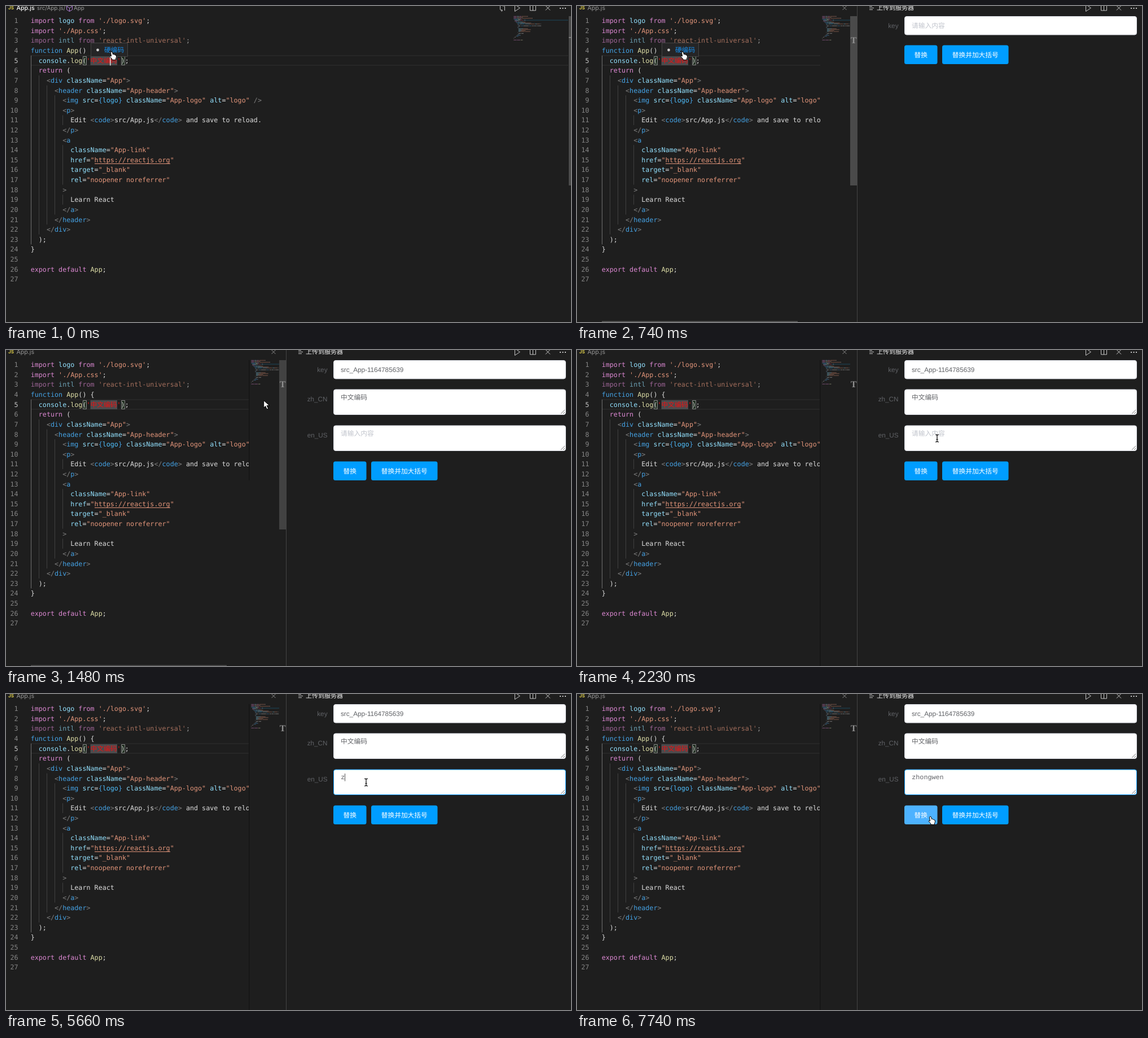
Animation of 1001x560 px, one loop 8 s. Source, as an HTML page with a canvas:

```html
<!DOCTYPE html>
<html lang="zh">
<head>
<meta charset="utf-8">
<style>
html, body { margin: 0; width: 100%; height: 100%; overflow: hidden; background: #1e1e1e }
canvas { display: block }
</style>
</head>
<body>
<canvas id="stage" width="1001" height="560"></canvas>
<script>
const c = document.getElementById('stage').getContext('2d');
const LOOP = 8000, CHAR = 7.056, ROW = 17.615, LEFT = 43.7;
const MONO = '11.72px "DejaVu Sans Mono", monospace';
const UI = '"Liberation Sans", "Noto Sans CJK SC", "Noto Sans CJK", sans-serif';
const CJK = '"Noto Sans CJK SC", "Noto Sans CJK", sans-serif';
const BODY = '11.72px ' + UI;

// "~x" switches to colour x
const COLORS = { k: '#dc88d2', v: '#92dffc', s: '#e2957a', w: '#dcdcdc', b: '#45a2e4',
  y: '#dfdfa8', g: '#808080', l: '#4fc1ff', r: '#f01010' };
const CODE = `~kimport~v logo~k from~s './logo.svg'~w;
~kimport~s './App.css'~w;
~kimport~v intl~k from~s 'react-intl-universal'~w;
~bfunction~y App~w() {
~v  console~w.~ylog~w(~r'中文编码'~w);
~k  return~w (
~g    <~bdiv~v className~w=~s"App"~g>
~g      <~bheader~v className~w=~s"App-header"~g>
~g        <~bimg~v src~w=~b{~llogo~b}~v className~w=~s"App-logo"~v alt~w=~s"logo"~g />
~g        <~bp~g>
~w          Edit ~g<~bcode~g>~wsrc/App.js~g</~bcode~g>~w and save to reload.
~g        </~bp~g>
~g        <~ba
~v          className~w=~s"App-link"
~v          href~w=~s"https://reactjs.org"
~v          target~w=~s"_blank"
~v          rel~w=~s"noopener noreferrer"
~g        >
~w          Learn React
~g        </~ba~g>
~g      </~bheader~g>
~g    </~bdiv~g>
~w  );
~w}

~kexport default~y App~w;
`.split('\n').map(line => {
  let col = 0;
  return line.split('~').slice(1).map(part => {
    const token = { color: COLORS[part[0]], text: part.slice(1), col };
    for (const ch of token.text) col += ch > '\u2fff' ? 11.75 / CHAR : 1;
    return token;
  });
});
// Indent guides: depth, first row, last row
const GUIDES = [[0, 5, 23], [1, 7, 22], [2, 8, 21], [3, 9, 20], [4, 11, 11], [4, 14, 17], [4, 19, 19]];

const rowTop = n => 17.3 + ROW * (n - 1);

function rect(x, y, w, h, color) {
  c.fillStyle = color;
  c.fillRect(x, y, w, h);
}
function text(str, x, y, color, font = BODY, align = 'left') {
  c.font = font;
  c.fillStyle = color;
  c.textAlign = align;
  c.fillText(str, x, y);
}
function box(x, y, w, h, r, fill, stroke) {
  c.beginPath();
  c.roundRect(x, y, w, h, r);
  if (fill) { c.fillStyle = fill; c.fill(); }
  if (stroke) { c.strokeStyle = stroke; c.lineWidth = 1; c.stroke(); }
}
function stroke(d, x, y, color, width = 1) {
  c.save();
  c.translate(x, y);
  c.strokeStyle = color;
  c.lineWidth = width;
  c.stroke(new Path2D(d));
  c.restore();
}
function shape(d, x, y) {
  c.save();
  c.translate(x, y);
  const path = new Path2D(d);
  c.fillStyle = '#fff';
  c.fill(path);
  c.restore();
  stroke(d, x, y, '#000');
}

function drawCode(split) {
  const right = split ? 431 : 996;
  rect(44, 87.5, right - 44, 1, '#303030');
  rect(44, 104.5, right - 44, 1, '#303030');
  for (const [depth, a, b] of GUIDES)
    rect(Math.round(LEFT + depth * 2 * CHAR), rowTop(a), 1, rowTop(b + 1) - rowTop(a), depth ? '#404040' : '#707070');
  rect(149.5, 89, 47.5, 16, '#4b4b4d');
  for (const x of [136.5, 204.5]) box(x, 89.5, 6, 15, 0, '#1c2a1c', '#8a8a8a');

  CODE.forEach((tokens, i) => {
    const base = 30.2 + ROW * i;
    text(i + 1, 21.5, base, i === 4 ? '#c6c6c6' : '#858585', MONO, 'right');
    c.save();
    c.beginPath();
    c.rect(0, 0, split ? 432 : 890, 560);
    c.clip();
    if (i === 2) c.globalAlpha = .67;
    for (const k of tokens) {
      const x = LEFT + k.col * CHAR;
      if (k.color === COLORS.r) {
        text("'", x, base, k.color, MONO);
        text('中文编码', x + CHAR, base + .5, k.color, '11.75px ' + CJK);
        text("'", x + CHAR + 47, base, k.color, MONO);
      } else text(k.text, x, base, k.color, MONO);
    }
    c.restore();
  });
  rect(157, 279, 134, 1, COLORS.s);
}

function drawMinimap(x0, right) {
  rect(x0 + 4, 24.5, right - x0 - 4, 1.2, '#1d4152');
  c.globalAlpha = .5;
  CODE.forEach((tokens, i) => {
    for (const k of tokens) [...k.text].forEach((ch, j) => {
      if (ch !== ' ') rect(x0 + (k.col + j) * .84, 17.8 + i * 1.68, .75, 1.1, k.color);
    });
  });
  c.globalAlpha = 1;
}

function drawTopBar(split) {
  const grey = '#c5c5c5';
  text('JS', 4, 6, '#d8c94a', 'bold 8px Inter, sans-serif');
  text('App.js', 18.5, 7, split ? '#969696' : '#fff', (split ? '' : '500 ') + '10.6px Inter, sans-serif');
  if (split) {
    stroke('M-3-3L4 4M4-3L-3 4', 473.5, 3, '#8a8a8a');
    stroke('M0-3H5M0 0H8M0 3H6', 518, 3.5, grey);
    text('上传到服务器', 531, 7.2, '#f2f2f2', '500 11px ' + CJK);
  } else {
    text('src/App.js/', 55, 7, '#9a9a9a', '9.8px Inter, sans-serif');
    stroke('M0-2L5-5L10-2V4L5 7L0 4ZM0-2L5 1L10-2M5 1V7', 107.5, 2.5, '#b180d7');
    text('App', 120, 7, '#9a9a9a', '9.8px Inter, sans-serif');
    stroke('M-4-3V4Q-4 6 0 6M-2 4L0 6L-2 8M4 6V-1Q4-3 0-3M2-5L0-3L2-1', 879.5, 2, grey);
  }
  stroke('M-4-4L5 2L-4 8Z', 905.5, 1.5, grey);
  stroke('M-5-4H5V5H-5ZM0-4V5', 933.5, 3, grey);
  stroke('M-4-4L4 4M4-4L-4 4', 960, 3.5, grey);
  for (const dx of [-5, -.5, 4]) rect(986 + dx, 3, 2, 2, grey);
}

function drawScrollbars(t) {
  c.globalAlpha = Math.max(0, Math.min(1, (2100 - t) / 760));
  rect(484, 18, 12, 300, '#4a4a4a');
  rect(44, 558.5, 347, 1.5, '#5a5a5a');
  c.globalAlpha = 1;
  text('T', 490, 66, '#909090', 'bold 16px "Liberation Serif", serif', 'center');
}

function drawPopup() {
  box(150.5, 65.5, 65, 24, 0, '#252526', '#454545');
  c.beginPath();
  c.arc(162.5, 78, 2.4, 0, 7);
  c.fillStyle = '#d0d0d0';
  c.fill();
  text('硬编码', 174, 81.7, '#1690f0', '11.72px ' + CJK);
}

function button(x, y, w, label, hover) {
  box(x, y, w, 33.5, 3.5, hover ? '#4db2ff' : '#009dff');
  text(label, x + w / 2, y + 21.2, '#fff', '500 11.72px ' + CJK, 'center');
}
function field(label, y, h, border = '#dcdfe6') {
  text(label, 569.5, y + 21, '#606266', BODY, 'right');
  box(580.5, y + .5, 411, h - 1, 3.5, '#fff', border);
  if (h > 40) stroke('M0 0L-7 7M0 4L-3 7', 990, y + h - 9, '#777');
}

// Blinking caret of the textarea
function caretOn(t) {
  const flips = [2670, 3120, 3720, 4170, 4610, 5210, 5660, 6700, 7150, 7740];
  return flips.filter(f => t >= f).length % 2 === 1;
}

function drawForm(t, m) {
  if (t < 890) {
    field('key', 18, 33.5);
    text('请输入内容', 593, 38.8, '#c0c4cc');
    button(580, 69.5, 58.5, '替换');
    button(647, 69.5, 117.5, '替换并加大括号');
    return;
  }
  field('key', 18, 33.5);
  text('src_App-1164785639', 593, 38.5, '#606266');
  field('zh_CN', 69.5, 45.5);
  text('中文编码', 593, 87.6, '#606266');
  field('en_US', 133.5, 45.5, t < 2670 ? '#dcdfe6' : t < 2820 ? '#7ec4fa' : '#109fff');

  const typed = t < 5660 ? 0 : t < 5800 ? 1 : t < 5950 ? 3 : t < 6250 ? 5 : 8;
  if (typed) text('zhongwen'.slice(0, typed), 593.3, 151, '#606266', '11.72px "Liberation Mono", monospace');
  else text('请输入内容', 593, 151.5, '#c0c4cc');
  if (caretOn(t)) rect(593 + typed * 7.03, 141, 1, 13.5, '#555');

  const over = (x, w) => m.y > 197 && m.y < 231 && m.x > x && m.x < x + w;
  button(580, 197.5, 58.5, '替换', over(580, 58.5));
  button(647, 197.5, 117.5, '替换并加大括号', over(647, 117.5));
}

function mouseAt(t) {
  if (t < 890) return { x: 187, y: 81, kind: 'hand' };
  if (t < 6700) {
    const p = Math.min(9, Math.floor((t - 890) / 148.8)) / 9;
    const x = 366 + 272 * p, y = 81 + 76 * p * p;
    return { x, y, kind: x < 432 || x > 580 ? 'beam' : 'arrow' };
  }
  const path = [[655, 182], [686, 222], [698, 248], [688, 253], [655, 240], [626, 217]];
  const [x, y] = path[Math.min(5, Math.floor((t - 6700) / 148))];
  const onButton = y > 197 && y < 231 && (x < 638 || x > 647);
  return { x, y, kind: onButton ? 'hand' : y < 179 ? 'beam' : 'arrow' };
}
function drawMouse({ x, y, kind }) {
  if (kind === 'beam')
    stroke('M-3-6.5Q0-6.5 0-5V5Q0 6.5-3 6.5M3-6.5Q0-6.5 0-5M0 5Q0 6.5 3 6.5M-1.5 2H1.5', x, y - .5, x < 432 ? '#fff' : '#000', 1.2);
  else if (kind === 'arrow')
    shape('M0 0V13L3 10L5.5 15.5L8 14.5L5.5 9H10Z', x, y);
  else
    shape('M-1.5 1Q0-1 1.5 1L2.5 5Q4 3.5 5 5.5Q6.5 4.5 7 6.5Q8.5 6 8.5 8Q8.5 11 7.5 12V14.5H1V13L-3 8.5Q-3 6.5-.5 8Z', x, y);
}

function draw(now) {
  const t = now % LOOP, split = t >= 440, m = mouseAt(t);
  rect(0, 0, 1001, 560, '#1e1e1e');
  drawCode(split);
  drawTopBar(split);
  if (split) {
    drawMinimap(434.5, 484);
    if (t >= 890) rect(430, 18, 1.5, t < 1780 ? 213 : 542, '#151515');
    drawScrollbars(t);
    rect(496, 0, 1, 560, '#444');
    if (t >= 740) drawForm(t, m);
  } else {
    drawMinimap(899.5, 996);
    rect(997, 18, 4, 300, '#4a4a4a');
    rect(997, 55, 4, 1.5, '#8a8a8a');
  }
  if (t < 1190) drawPopup();
  if (t < 150) rect(184, 90, 1.5, 15.5, '#e0e0e0');
  if (t >= 3120 && t < 5210) {
    rect(870, 0, 131, 14, 'rgba(30,30,30,.85)');
    rect(895, 0, 36, 14, '#1e1e1e');
    text('Abc', 896.5, 4.5, '#fff', '500 19px Inter, sans-serif');
  }
  drawMouse(m);
  requestAnimationFrame(() => draw(performance.now()));
}
c.textRendering = 'geometricPrecision';
draw(0);
</script>
</body>
</html>
```
